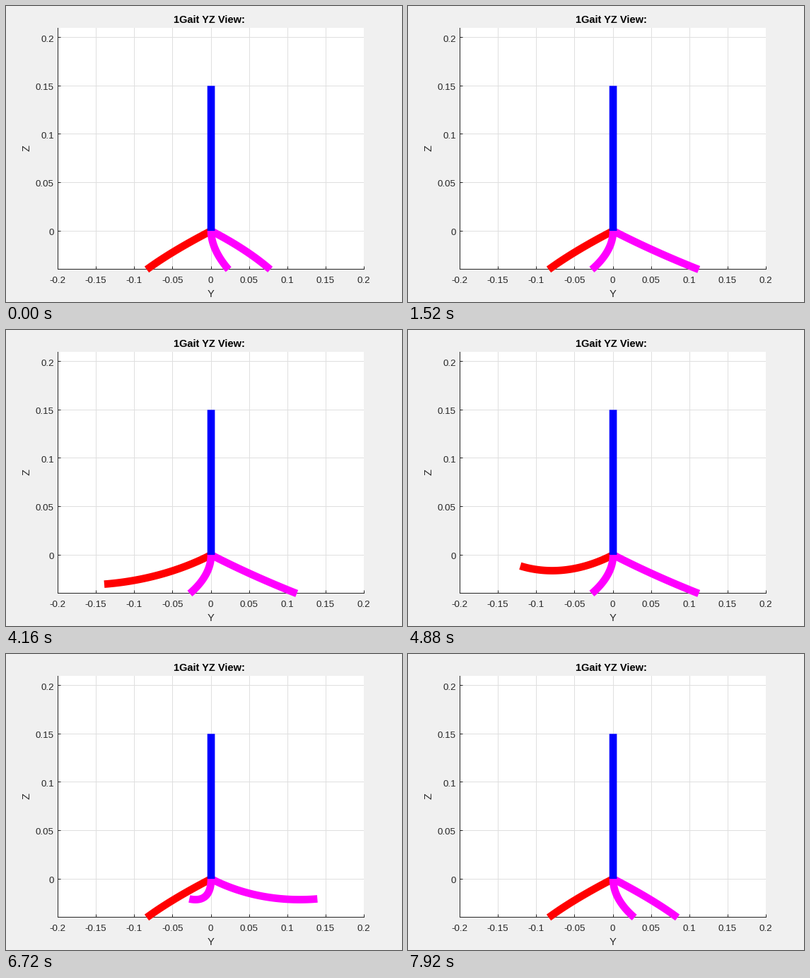
Animation, 560 px wide and 420 px high, one loop 8000 ms. Source, as a matplotlib script:

```python
import matplotlib.pyplot as plt
import numpy as np
from matplotlib.animation import FuncAnimation
from matplotlib.transforms import Affine2D

W, H, DPI = 560, 420, 96
FRAMES, STEP_MS = 100, 80
SWING = 40                      # frames one gait circle takes
LENGTH, BEND = 0.15, 0.55       # limb length and total bending angle
GROUND = -0.04
INK = "#262626"
LEFT, RIGHT, TOP, BOTTOM = 73.02, 506.06, 30.51, 373.43

plt.rcParams["font.family"] = "Liberation Sans"
fig = plt.figure(figsize=(W / DPI, H / DPI), dpi=DPI, facecolor="#f0f0f0")
ax = fig.add_axes([LEFT / W, 1 - BOTTOM / H, (RIGHT - LEFT) / W, (BOTTOM - TOP) / H])
ax.set(xlim=(-0.2, 0.2), ylim=(GROUND, 0.21))
ax.set_axisbelow(True)
ax.grid(color="#dfdfdf", lw=0.75)
ax.spines[["top", "right"]].set_visible(False)
for side in ("left", "bottom"):
    ax.spines[side].set(color=INK, linewidth=0.75, zorder=1.5)


def label(x, y, text, size=10, **kw):
    """Place text by its baseline, in pixels from the top left."""
    kw = {"ha": "center", "color": INK, **kw}
    fig.text(x / W, 1 - y / H, text, fontsize=size, **kw)


xticks = np.arange(-4, 5) * 0.05
yticks = np.arange(0, 5) * 0.05
ax.set_xticks(xticks)
ax.set_yticks(yticks)
ax.tick_params(direction="in", length=3.3, width=0.75, color=INK,
               labelbottom=False, labelleft=False)
for x in xticks:
    label(289.3 + x * 1083, 393, f"{round(x, 2) + 0:g}")
for y in yticks:
    label(68, 324.8 - y * 1371, f"{round(y, 2):g}", ha="right")
label(287.6, 24, "1Gait YZ View:", 11, weight="bold", color="black")
label(289.3, 413, "Y", 11)
label(37, 201.5, "Z", 11, rotation=90, va="center", ha="right")


def limb(azimuth, phi):
    """Constant-curvature limb seen in the YZ plane, cut at the ground."""
    ca, sa = np.cos(azimuth), np.sin(azimuth)
    drop = 1 / 3
    reach = np.sqrt(1 - drop ** 2)
    tangent = np.array([reach * ca, -drop])
    normal = np.cos(phi) * np.array([drop * ca, reach]) + np.sin(phi) * np.array([sa, 0])
    angle = np.linspace(1e-6, BEND, 80)[:, None]
    pts = LENGTH / BEND * (np.sin(angle) * tangent + (1 - np.cos(angle)) * normal)
    below = np.flatnonzero(pts[:, 1] < GROUND)
    if below.size:
        i = below[0]
        a, b = pts[i - 1], pts[i]
        cut = a + (b - a) * (GROUND - a[1]) / (b[1] - a[1])
        pts = np.vstack([pts[:i], cut])
    return pts.T


# grid lines snap to pixel centres, so the unsnapped limbs move half a pixel
pixel_centre = ax.transData + Affine2D().translate(0.5, -0.5)


def bar(color, z):
    return ax.plot([], [], color=color, lw=8, solid_capstyle="butt", snap=False,
                   clip_on=False, zorder=z, transform=pixel_centre)[0]


red, outer, inner, body = (bar(c, 3 + i) for i, c in
                           enumerate(("#ff0000", "#ff00ff", "#ff00ff", "#0000ff")))
body.set_data([0, 0], [0, LENGTH])


def turn(k, start):
    return 2 * np.pi * min((k - start) % FRAMES, SWING) / SWING


def draw(k):
    back = np.pi / 2 + turn(k, 29)
    front = np.pi / 2 - turn(k, 79)
    red.set_data(*limb(np.radians(150), back))
    outer.set_data(*limb(np.radians(30), front))
    inner.set_data(*limb(np.radians(-90), front))
    return red, outer, inner, body


anim = FuncAnimation(fig, draw, frames=FRAMES, interval=STEP_MS,
                     repeat=True, repeat_delay=0, blit=False)
plt.show()
```
